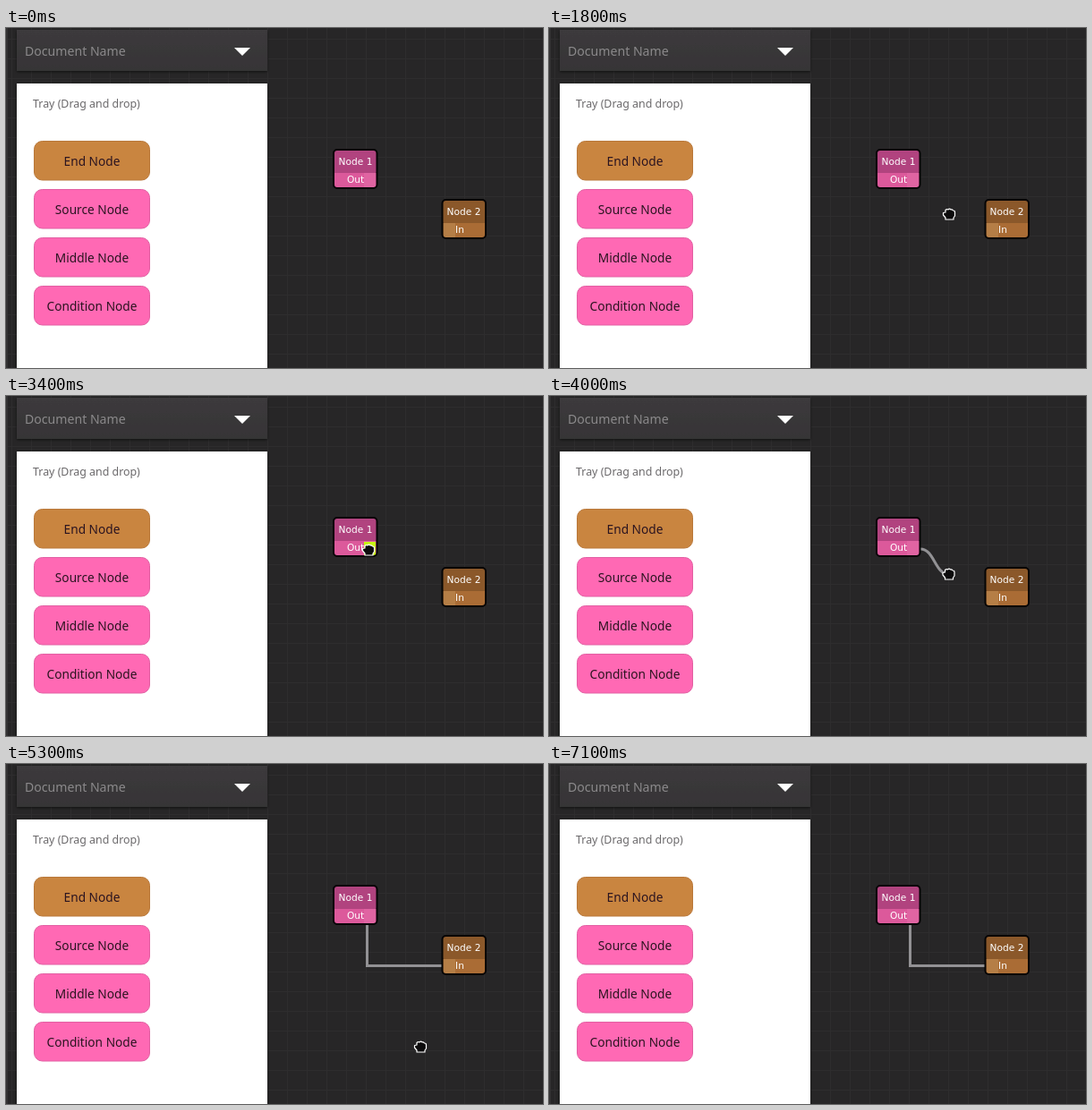
Recreate the animation shown at these times as an HTML page. Size 600x380 px, loop 7600 ms.

```html
<!DOCTYPE html>
<html lang="en">
<head>
<meta charset="utf-8">
<title>Node editor</title>
<style>
  html, body { margin: 0; width: 100%; height: 100%; overflow: hidden; background: #272627; }
  svg { display: block; width: 600px; height: 380px; }
  text { text-anchor: middle; }
  .ui { font-family: "Noto Sans", "Open Sans", sans-serif; }
  .left { text-anchor: start; }
  .tray text { font-size: 13.7px; fill: #2b1420; }
  .node text { font: 10.6px "DejaVu Sans", sans-serif; fill: #fff; }
  .frame { fill: none; stroke: #050405; stroke-width: 2; }
  .wire { fill: none; stroke: #929194; stroke-width: 3; }
  .port { fill: #c8f514; }
</style>
</head>
<body>
<svg viewBox="0 0 600 380">
  <defs>
    <pattern id="grid" width="22" height="22" x="6" y="12" patternUnits="userSpaceOnUse">
      <path d="M.5 0V22M0 .5H22" stroke="#2e2d2e" fill="none"/>
    </pattern>
    <linearGradient id="bar" x2="0" y2="1">
      <stop stop-color="#3c3a3c"/><stop offset="1" stop-color="#363436"/>
    </linearGradient>
    <filter id="shade" x="-5%" y="-5%" width="110%" height="125%">
      <feDropShadow dx="0" dy="1" stdDeviation="1.5" flood-color="#000" flood-opacity=".6"/>
    </filter>
  </defs>

  <rect width="600" height="380" fill="#272627"/>
  <rect width="600" height="380" fill="url(#grid)"/>
  <rect width="2" height="380" fill="#333233"/>

  <path id="wire" class="wire"/>

  <g class="node">
    <rect x="366" y="136" width="48" height="27" rx="3" fill="#b1437f"/>
    <path d="M366 162H414V176Q414 179 411 179H369Q366 179 366 176Z" fill="#dc599b"/>
    <rect x="400" y="162" width="13" height="16" fill="#e064a2"/>
    <rect id="out" class="port" x="400" y="163" width="13" height="16"/>
    <rect class="frame" x="366" y="136" width="48.5" height="43" rx="4"/>
    <text x="390.5" y="153">Node 1</text>
    <text x="390.5" y="173">Out</text>
  </g>
  <g class="node">
    <rect x="488" y="192" width="48" height="27" rx="3" fill="#8b582a"/>
    <path d="M488 218H536V232Q536 235 533 235H491Q488 235 488 232Z" fill="#aa6c35"/>
    <rect x="489" y="218" width="13" height="16" fill="#b57e46"/>
    <rect id="in" class="port" x="489" y="219" width="13" height="15"/>
    <rect class="frame" x="487.5" y="192" width="48.5" height="43" rx="4"/>
    <text x="511.5" y="209">Node 2</text>
    <text x="507" y="229">In</text>
  </g>

  <g class="ui">
    <rect x="12" y="2" width="280" height="46" fill="url(#bar)" filter="url(#shade)"/>
    <text class="left" x="21" y="31" font-size="14.1" fill="#8b898b">Document Name</text>
    <path d="M255 22H273L264 31Z" fill="#fff"/>
    <rect x="12" y="62" width="280" height="330" fill="#fff" filter="url(#shade)"/>
    <text class="left" x="30" y="89" font-size="12.4" fill="#6b696b">Tray (Drag and drop)</text>
    <g id="tray" class="tray"></g>
  </g>

  <g id="hand" stroke-linejoin="round">
    <path d="M-4 6V4L-6.5 1V-1.5L-4 -2V-4.5Q-2.5 -6 -1 -5Q.5 -6.5 2 -5Q3.500 -5.500 4.500 -4Q6.500 -4 6.500 -2V2L5 4V6Z"
          fill="#0c0b0c" stroke="#fff" stroke-width="1.2"/>
  </g>
</svg>
<script>
const LOOP = 7600, STEP = 100;
const SHOW = 800, HIDE = 7000, GRAB = 3600, DROP = 4700;

// Pointer stops: time, x, y
const stops = [
  [800, 466, 318], [1200, 455, 250], [1800, 447, 208], [2500, 432, 192],
  [3200, 405, 172], [3600, 405, 172], [4400, 488, 226], [4800, 488, 226],
  [5300, 463, 316], [5500, 458, 361], [5600, 456, 308], [6400, 456, 300],
  [6900, 460, 371]
];
const $ = id => document.getElementById(id);
const [wire, out, inp, hand] = ["wire", "out", "in", "hand"].map($);

$("tray").innerHTML = ["End", "Source", "Middle", "Condition"].map((name, i) => {
  const y = 126 + i * 54;
  const [fill, edge] = i ? ["#ff69b4", "#e25fa2"] : ["#c98540", "#b9783a"];
  return `<rect x="31.5" y="${y + .5}" width="129" height="43.5" rx="9" fill="${fill}" stroke="${edge}"/>
    <text x="96" y="${y + 27.5}">${name} Node</text>`;
}).join("");

function pointer(t) {
  const i = stops.findIndex(s => s[0] > t);
  if (i < 0) return stops[stops.length - 1].slice(1);
  if (i === 0) return stops[0].slice(1);
  const [t0, x0, y0] = stops[i - 1], [t1, x1, y1] = stops[i];
  const u = (t - t0) / (t1 - t0), k = u * u * (3 - 2 * u);
  return [x0 + (x1 - x0) * k, y0 + (y1 - y0) * k];
}

function wirePath(t, x, y) {
  if (t < GRAB) return "";
  if (t >= DROP) return "M403.500 180V225.500H487";
  const mid = (415 + x) / 2;
  return `M415 171C${mid} 171 ${mid} ${y} ${x} ${y}`;
}

const show = (el, on) => el.setAttribute("visibility", on ? "visible" : "hidden");

function draw(now) {
  const t = Math.floor(now % LOOP / STEP) * STEP;
  const [x, y] = pointer(t);
  const seen = t >= SHOW && t < HIDE;
  const over = (left, top) => seen && x >= left && x <= left + 16 && y >= top && y <= top + 17;
  hand.setAttribute("transform", `translate(${x} ${y})`);
  show(hand, seen);
  show(out, over(399, 162));
  show(inp, over(486, 218));
  wire.setAttribute("d", wirePath(t, x, y));
}

const start = performance.now();
function tick() {
  draw(performance.now() - start);
  requestAnimationFrame(tick);
}
tick();
</script>
</body>
</html>
```
